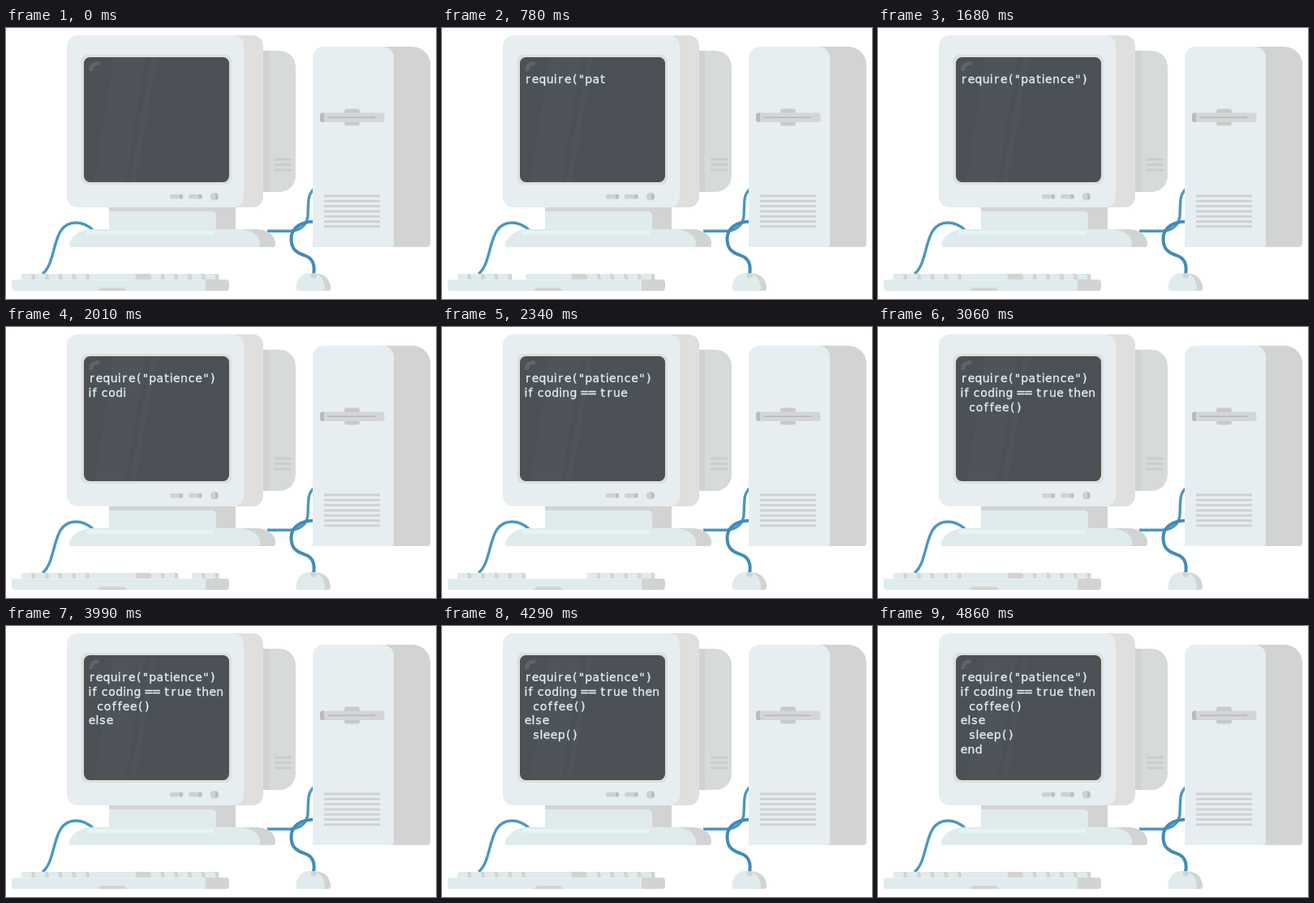
These frames come from a looping animation (530x334 px, 6.84 s). An HTML page:

```html
<!DOCTYPE html>
<html lang="en">
<head>
<meta charset="utf-8">
<title>Coding computer</title>
<style>
  html, body { margin: 0; width: 100%; height: 100%; overflow: hidden; background: #fff; }
  svg { display: block; width: 100vw; height: 100vh; }
  text { font: 14px "DejaVu Sans", sans-serif; fill: #e0eef0; stroke: #e0eef0; stroke-width: .35; text-anchor: middle; }
  .front { fill: #e7eef2; }
  .side { fill: #d2d4d3; }
  .pale { fill: #dfebec; }
  .line { fill: none; stroke: #d0d2d2; stroke-width: 3; }
  .cable { fill: none; stroke: #4a97c2; stroke-width: 3.4; }
</style>
</head>
<body>
<svg viewBox="0 0 530 334" preserveAspectRatio="none">
  <!-- cables -->
  <path class="cable" d="M45 303C64 288 55 240 86 240Q98 240 107 249"/>
  <path class="cable" d="M322 250.300H350C362 250 371 243 372 232C373 212 371 206 381 197"/>
  <path class="cable" style="stroke:#428bb7;stroke-width:4" d="M381 238.500C362 238.500 351.500 247 351.500 260C351.500 277 364 278.500 372 282C379 286 381 293 379 304"/>

  <!-- tower -->
  <path class="side" d="M400 23H501A22 22 0 0 1 523 45V266Q523 270 519 270H400Z"/>
  <path class="front" d="M378 270V37A14 14 0 0 1 392 23H464A14 14 0 0 1 478 37V266Q478 270 474 270Z"/>
  <rect x="417" y="99.500" width="19" height="21" rx="3" fill="#c8caca"/>
  <rect x="387" y="104.500" width="79.500" height="11.500" rx="3" fill="#d3d5d6"/>
  <path d="M392 104.500H390Q387 104.500 387 108V112.500Q387 116 390 116H392Z" fill="#b9bcbc"/>
  <path d="M397 110.300H455" stroke="#b5b8b9" stroke-width="1.600"/>
  <path class="line" d="M392 207H461M392 213.300H461M392 219.600H461M392 225.900H461M392 232.200H461M392 238.500H461M392 244.800H461"/>

  <!-- stand -->
  <path class="side" d="M127 218H283V252H127Z"/>
  <path class="pale" d="M127 226H253Q259 226 259 232V252H127Z"/>
  <path class="side" d="M250 248H311Q329 250 332 263V267Q332 270 329 270H250Z"/>
  <path class="pale" d="M103 248H289Q309 250 313 263V267Q313 270 310 270H81Q77 270 78 265Q85 250 103 248Z"/>
  <path d="M101 250H256V255H99Q98 251 101 250Z" fill="#e5f5f6"/>

  <!-- monitor -->
  <rect x="280" y="28" width="77" height="174" rx="20" fill="#d7dada"/>
  <path d="M310 28H324V202H310Z" fill="#d0d2d2"/>
  <path class="line" style="stroke:#c9cccc;stroke-width:2.500" d="M331 162H352M331 168.500H352M331 175H352"/>
  <rect x="120" y="9" width="197" height="212" rx="13" fill="#dfdfdd"/>
  <rect class="front" x="75" y="9" width="218" height="212" rx="13"/>
  <rect x="92.500" y="33" width="185.500" height="160" rx="8" fill="#e0dfdc"/>
  <rect x="96" y="36" width="179" height="154" rx="7.500" fill="#4c5158"/>
  <path d="M133 36H172L147 190H109ZM179 36H186L160 190H153Z" fill="#4f545b"/>
  <path d="M104.500 53Q104.500 43.500 115 43.500" fill="none" stroke="#5f646a" stroke-width="4.500"/>
  <g fill="#d0d1d1">
    <rect x="202" y="205" width="16.500" height="5.500" rx="2"/>
    <rect x="225" y="205" width="17" height="5.500" rx="2"/>
    <circle cx="256.500" cy="207.800" r="4.800"/>
  </g>
  <path d="M214 205h3q2 3 0 5.500h-3zM237.500 205h3q2 3 0 5.500h-3zM258 203.500q4 0 4 4.300t-4 4.300z" fill="#bcbebe"/>

  <g id="code"></g>

  <!-- keyboard -->
  <g id="keys"></g>
  <path class="side" d="M240 310H271Q275 310 275 314V320Q275 324 271 324H240Z"/>
  <path class="pale" d="M10 310H246V324H11Q7 324 7 320V313Q7 310 10 310Z"/>
  <path d="M8 310.500H246" stroke="#e9f1f3"/>
  <path class="side" d="M117 320H145L149 324H113Z"/>

  <!-- mouse -->
  <path class="side" d="M370 302.500H382Q397 303 400 318V321Q400 324 397 324H370Z"/>
  <path class="pale" d="M361 324Q357.500 324 357.500 320C358 309 364 302.500 373 302.500H378Q390 303 393 318V321Q393 324 390 324Z"/>
  <path class="side" d="M375.500 302.500H383V306Q379 311 375.500 306Z"/>
</svg>
<script>
const LOOP = 6840, STEP = 30, KEY = 16.7, BAR = 10;
const advance = { i: 4, l: 4, ' ': 4.6, r: 9, t: 7.3, f: 7, '(': 8, ')': 8, '"': 8.5, '=': 9.5 };

// text, typing start, left edge, key struck per character (a = space bar)
const lines = [
  ['require("patience")', 450, 102, '3096032187547250291'],
  ['if coding == true then', 1830, 102, '73a586754a66a4365a4520'],
  ['coffee()', 2820, 112, '28332286'],
  ['else', 3630, 102, '9689'],
  ['sleep()', 4080, 112, '5822976'],
  ['end', 4740, 102, '597']
];

function add(parent, tag, attrs) {
  const el = document.createElementNS('http://www.w3.org/2000/svg', tag);
  for (const name in attrs) el.setAttribute(name, attrs[name]);
  return parent.appendChild(el);
}

const code = document.getElementById('code');
const rows = lines.map(([text, start, left, strokes], i) => {
  let x = left;
  const centres = [...text].map(c => {
    const w = advance[c] || 9.1;
    x += w;
    return (x - w / 2 - 0.6).toFixed(1);
  });
  const el = add(code, 'text', { x: centres.join(' '), y: 68 + i * 17.8 });
  return { el, text, start, strokes, shown: 0 };
});

const board = document.getElementById('keys');
function keycap(x, w, shade) {
  const key = add(board, 'g', {});
  const cap = (width, name) =>
    add(key, 'path', { d: `M${x} 311V304.500l1.500-1.500h${width - 3}l1.500 1.500V311Z`, class: name });
  cap(w, 'side');
  cap(w - shade, 'pale');
  return key;
}

const keys = Array.from({ length: 10 }, (_, i) =>
  keycap(i < 5 ? 19.5 + i * KEY : 179 + (i - 5) * KEY, KEY, 4.5));
keys[BAR] = keycap(103.5, 75.5, 19);

function draw(now) {
  const t = now % LOOP;
  let pressed = -1;
  for (const row of rows) {
    const n = Math.max(0, Math.floor((t - row.start) / STEP) + 1);
    const count = Math.min(n, row.text.length);
    if (count !== row.shown) {
      row.el.textContent = row.text.slice(0, count);
      row.shown = count;
    }
    if (n > 0 && n <= row.text.length) pressed = parseInt(row.strokes[n - 1], 11);
  }
  keys.forEach((key, i) => key.setAttribute('visibility', i === pressed ? 'hidden' : 'visible'));
}

const begin = performance.now();
function tick() {
  draw(performance.now() - begin);
  requestAnimationFrame(tick);
}
tick();
</script>
</body>
</html>
```
